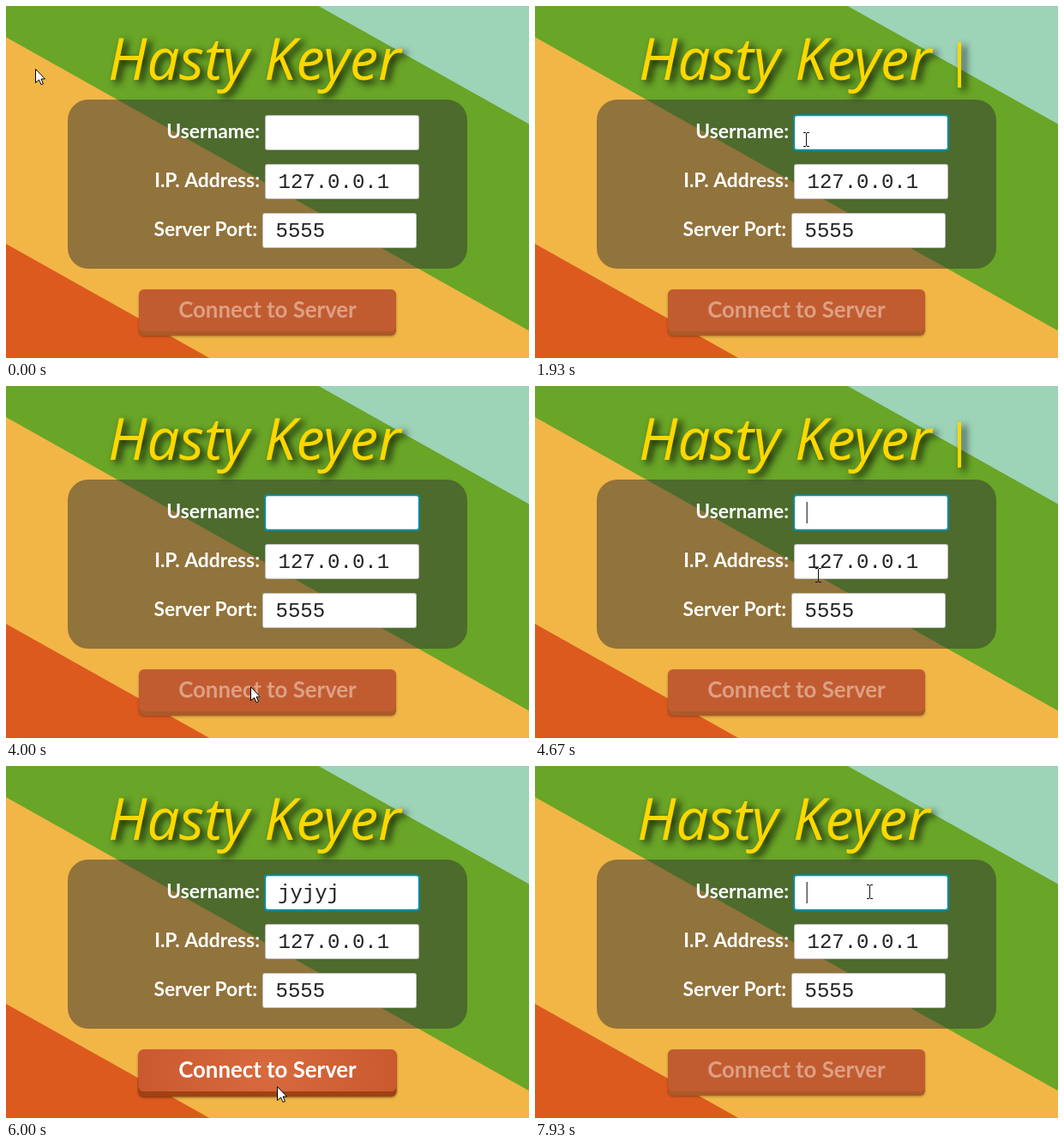
These frames come from a looping animation (610x410 px, 8 s). An HTML page with a canvas:

```html
<!DOCTYPE html>
<html lang="en">
<head>
<meta charset="utf-8">
<title>Hasty Keyer</title>
<style>
  html, body { margin: 0; width: 100%; height: 100%; overflow: hidden; }
  canvas { display: block; }
</style>
</head>
<body>
<canvas id="stage" width="610" height="410"></canvas>
<script>
const ctx = document.getElementById('stage').getContext('2d');
const WIDTH = 610, HEIGHT = 410, LOOP = 8000, STEP = 1000 / 15;
const TITLE_FONT = 'italic 67px "Open Sans", sans-serif';
const LABEL_FONT = 'bold 22.8px Lato, sans-serif';
const BUTTON_FONT = 'bold 25.8px Lato, sans-serif';
const FIELD_FONT = '24px "Liberation Mono", monospace';
const FIELD_W = 180, FIELD_H = 41, CHAR_WIDTH = 14.4;
const USER = 'jyjyj';
const FOCUS = 1390, TYPING = 4860, KEY_GAP = 116, SELECT = 7520, ERASE = 7720;

const fields = [
  { label: 'Username:', x: 302, y: 127 },
  { label: 'I.P. Address:', x: 302, y: 184, text: '127.0.0.1' },
  { label: 'Server Port:', x: 299, y: 241, text: '5555' }
];

// Places the pointer visits, with the time it arrives
const stops = [
  { at: 0, x: 34, y: 73 },
  { at: 467, x: 403, y: 139 },
  { at: 800, x: 390, y: 147 },
  { at: 1200, x: 362, y: 151 },
  { at: 1930, x: 316, y: 155 },
  { at: 2560, x: 326, y: 240 },
  { at: 3200, x: 343, y: 194 },
  { at: 3600, x: 292, y: 371 },
  { at: 3930, x: 285, y: 350 },
  { at: 4670, x: 330, y: 220 },
  { at: 6000, x: 316, y: 373 },
  { at: 6530, x: 390, y: 146 }
];

// Longer trips take longer, but never start before the previous stop
function pointerAt(t) {
  const i = stops.findIndex(s => s.at > t);
  if (i < 0) return stops[stops.length - 1];
  const from = stops[i - 1], to = stops[i];
  const distance = Math.hypot(to.x - from.x, to.y - from.y);
  const duration = Math.min(to.at - from.at, 120 + 2 * distance);
  const u = Math.max(0, 1 - (to.at - t) / duration);
  const eased = u * u * (3 - 2 * u);
  return {
    x: Math.round(from.x + (to.x - from.x) * eased),
    y: Math.round(from.y + (to.y - from.y) * eased)
  };
}

function box(x, y, w, h, r, fill) {
  ctx.fillStyle = fill;
  ctx.beginPath();
  ctx.roundRect(x, y, w, h, r);
  ctx.fill();
}

function write(text, x, y, font, color, align = 'left') {
  ctx.font = font;
  ctx.fillStyle = color;
  ctx.textAlign = align;
  ctx.fillText(text, x, y);
}

// Evenly spaced parallel bands
function drawBackground() {
  const slope = 0.5605;
  box(0, 0, WIDTH, HEIGHT, 0, '#9dd3b7');
  ['#69a527', '#f2b646', '#dd5a1f'].forEach((color, i) => {
    const y = -204.4 + 240.7 * i;
    ctx.fillStyle = color;
    ctx.beginPath();
    ctx.moveTo(0, y);
    ctx.lineTo(WIDTH, y + slope * WIDTH);
    ctx.lineTo(WIDTH, 2 * HEIGHT);
    ctx.lineTo(0, 2 * HEIGHT);
    ctx.fill();
  });
}

function drawTitle(t) {
  const phase = t % 1000, lateOff = Math.floor(t / 1000) % 5 < 2;
  const barOn = phase > 460 && phase < (lateOff ? 1000 : 925);
  ctx.save();
  ctx.shadowColor = 'rgba(0,0,0,.9)';
  ctx.shadowBlur = 8;
  ctx.shadowOffsetX = 5;
  ctx.shadowOffsetY = 4;
  write('Hasty Keyer', barOn ? 121 : 119, 86, TITLE_FONT, '#ffd700');
  if (barOn) box(493, 42, 4, 53, 0, '#ffd700');
  ctx.restore();
}

function drawField({ label, x, y, text = '' }, focused) {
  write(label, x - 6, y + 27, LABEL_FONT, '#fff', 'right');
  const grow = focused ? 0.7 : 0, edge = focused ? 1.2 : 1;
  box(x - grow, y - grow, FIELD_W + 2 * grow, FIELD_H + 2 * grow, 3, focused ? '#078fae' : '#bdbdbd');
  box(x + edge, y + edge, FIELD_W - 2 * edge, FIELD_H - 2 * edge, 2, '#fff');
  write(text, x + 15.5, y + 28, FIELD_FONT, '#222');
}

function drawUser(t, typed) {
  const left = fields[0].x + 15, selected = t >= SELECT && t < ERASE;
  const width = typed * CHAR_WIDTH;
  if (selected) box(left, 135, width, 25, 0, '#0096c9');
  write(USER.slice(0, typed), left, 155, FIELD_FONT, selected ? '#fff' : '#222');
  if (t < FOCUS || selected) return;
  const lastKey = TYPING + (typed - 1) * KEY_GAP;
  const reset = t >= ERASE ? ERASE : typed ? lastKey : FOCUS;
  if ((t - reset) % 1000 < 500) box(Math.round(left + width) - 0.5, 135, 1.5, 25, 0, '#555');
}

function drawButton(enabled) {
  const grow = enabled ? 0.5 : 0;
  ctx.save();
  ctx.shadowColor = `rgba(0,0,0,${enabled ? 0.5 : 0.3})`;
  ctx.shadowBlur = 3;
  ctx.shadowOffsetY = 1;
  box(155 - grow, 331, 300 + 2 * grow, 53 + 2 * grow, 6, enabled ? '#a14112' : '#ab5a27');
  ctx.restore();
  let face = '#c15c31';
  if (enabled) {
    face = ctx.createRadialGradient(305, 354, 0, 305, 354, 150);
    face.addColorStop(0, '#d76a3e');
    face.addColorStop(1, '#cb5930');
  }
  box(155 - grow, 330, 300 + 2 * grow, 49, 6, face);
  write('Connect to Server', 305, 363, BUTTON_FONT, enabled ? '#fff' : '#dda084', 'center');
}

function drawTextPointer(x, y) {
  box(x, y - 7, 1, 15, 0, '#111');
  for (const dy of [-8, 8]) {
    box(x - 3, y + dy, 3, 1, 0, '#111');
    box(x + 1, y + dy, 3, 1, 0, '#111');
  }
}

function drawArrow(x, y) {
  const outline = new Path2D('M0 0V16L4 12.5 6.5 18 9 17 6.5 11.5H11Z');
  ctx.save();
  ctx.translate(x + 0.5, y + 0.5);
  ctx.fillStyle = '#fff';
  ctx.fill(outline);
  ctx.strokeStyle = '#000';
  ctx.stroke(outline);
  ctx.restore();
}

function drawPointer({ x, y }) {
  const inField = fields.some(f =>
    x >= f.x && x < f.x + FIELD_W && y >= f.y && y < f.y + FIELD_H);
  (inField ? drawTextPointer : drawArrow)(x, y);
}

function typedAt(t) {
  if (t < TYPING || t >= ERASE) return 0;
  return Math.min(USER.length, 1 + Math.floor((t - TYPING) / KEY_GAP));
}

function draw(t) {
  const typed = typedAt(t);
  drawBackground();
  drawTitle(t);
  box(72, 109, 466, 197, 24, 'rgba(50,51,51,.5)');
  fields.forEach((field, i) => drawField(field, i === 0 && t >= FOCUS));
  drawUser(t, typed);
  drawButton(typed > 0);
  drawPointer(pointerAt(t));
}

const start = performance.now();
function tick() {
  const now = Math.max(0, performance.now() - start) % LOOP;
  const step = Math.floor((now + 4) / STEP) % (LOOP / STEP);
  draw(step * STEP);
  requestAnimationFrame(tick);
}
tick();
</script>
</body>
</html>
```
